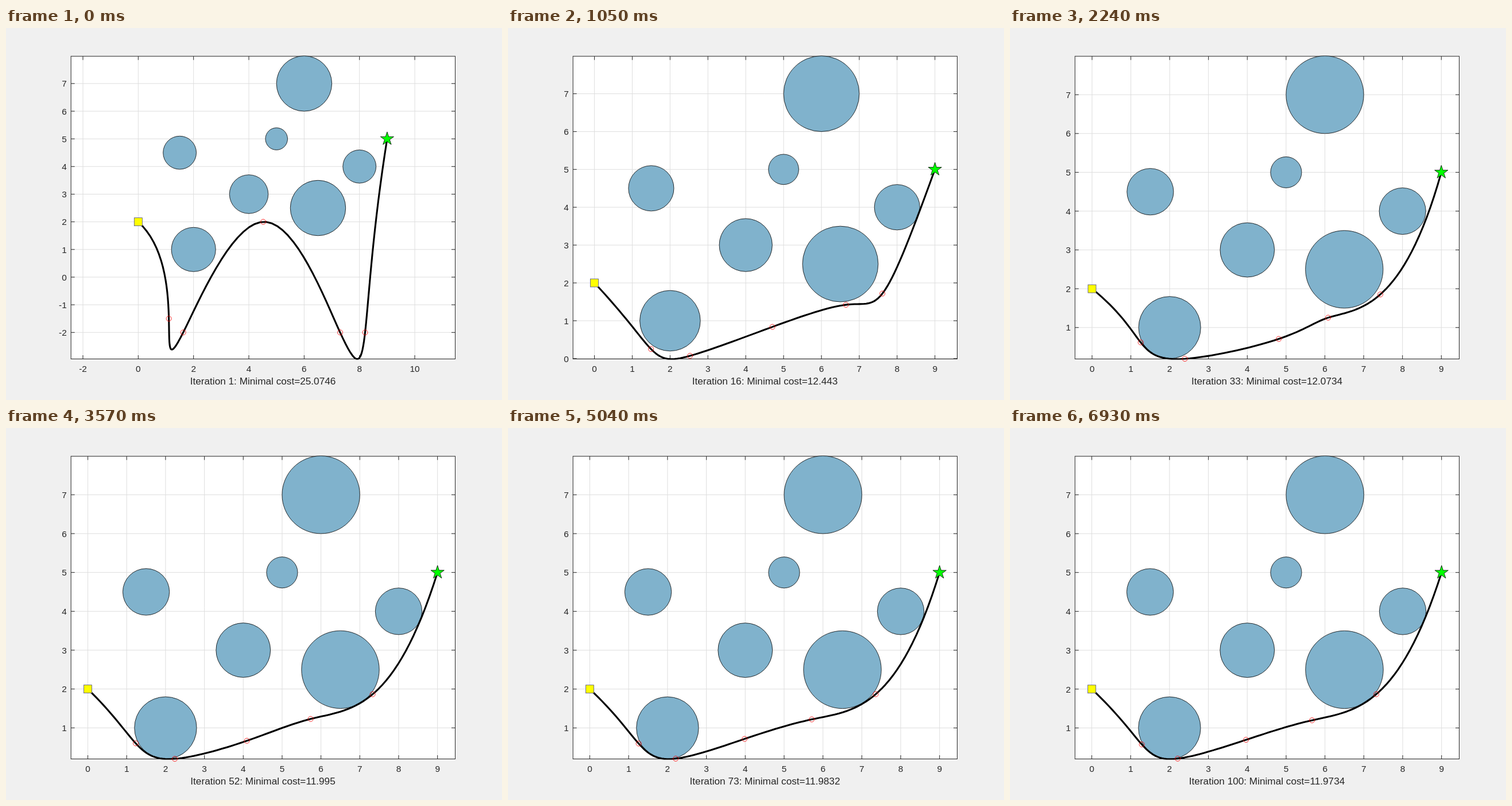
Recreate the animation shown at these times as an HTML page with a canvas. Size 864x648 px, loop 7 s.

```html
<!DOCTYPE html>
<html>
<head>
<meta charset="utf-8">
<style>
html, body { margin: 0; height: 100%; overflow: hidden; background: #f0f0f0; }
canvas { display: block; }
</style>
</head>
<body>
<canvas id="stage" width="864" height="648"></canvas>
<script>
const ctx = document.getElementById('stage').getContext('2d');
// Plot area as fractions of the stage
const LEFT = .13 * 864, RIGHT = .905 * 864, TOP = .075 * 648, BOTTOM = .89 * 648;
// Border lines, on the pixel grid
const BOX = { left: 113.2, right: 782.5, top: 49.2, bottom: 576.5 };
const INK = '#262626', GRID = '#dedede', FONT = '"Liberation Sans", Arial, sans-serif';
const START = [0, 2], GOAL = [9, 5], Y_MAX = 8;
const STEP_MS = 70, STEPS = 100;

// x, y, radius
const obstacles = [
  [1.5, 4.5, .6], [4, 3, .7], [2, 1, .8], [6, 7, 1],
  [5, 5, .4], [8, 4, .6], [6.5, 2.5, 1]
];

// Best solutions: iteration, cost and the five path handles
const solutions = [
  { at: 1, cost: 25.0746, x: [1.107, 1.627, 4.52, 7.3, 8.203], y: [-1.5, -2, 2, -2, -2] },
  { at: 7, cost: 13.4485, x: [1.258, 2.382, 4.815, 6.351, 8.437], y: [.506, -.222, -.495, .571, 1.994] },
  { at: 16, cost: 12.443, x: [1.496, 2.527, 4.705, 6.648, 7.611], y: [.252, .073, .838, 1.422, 1.718] },
  { at: 33, cost: 12.0734, x: [1.253, 2.392, 4.811, 6.083, 7.429], y: [.618, .195, .707, 1.254, 1.854] },
  { at: 52, cost: 11.995, x: [1.233, 2.238, 4.093, 5.734, 7.33], y: [.602, .203, .668, 1.23, 1.866] },
  { at: 73, cost: 11.9832, x: [1.257, 2.21, 3.983, 5.711, 7.358], y: [.599, .21, .718, 1.22, 1.869] },
  { at: 100, cost: 11.9734, x: [1.287, 2.21, 3.968, 5.667, 7.321], y: [.576, .211, .695, 1.197, 1.869] }
];

function solutionAt(iteration) {
  let i = 0;
  while (i < solutions.length - 2 && solutions[i + 1].at <= iteration) i++;
  const a = solutions[i], b = solutions[i + 1];
  const u = 1 - (1 - (iteration - a.at) / (b.at - a.at)) ** 2;
  const mix = (p, q) => p.map((v, k) => v + (q[k] - v) * u);
  return {
    cost: a.cost * (b.cost / a.cost) ** u,
    x: [START[0], ...mix(a.x, b.x), GOAL[0]],
    y: [START[1], ...mix(a.y, b.y), GOAL[1]]
  };
}

// Not-a-knot cubic spline through seven evenly spaced values
function spline(v) {
  const d = v.map((c, i) => v[i - 1] - 2 * c + v[i + 1]);
  const p = 6 * d[2] - d[1], q = 6 * d[4] - d[5];
  const m3 = (6 * d[3] - (p + q) / 4) / 3.5;
  const m2 = (p - m3) / 4, m4 = (q - m3) / 4;
  const m = [2 * d[1] - m2, d[1], m2, m3, m4, d[5], 2 * d[5] - m4];
  return Array.from({ length: 100 }, (_, k) => {
    const s = k / 99 * 6, i = Math.min(5, Math.floor(s)), b = s - i, a = 1 - b;
    return a * v[i] + b * v[i + 1] + (m[i] * (a ** 3 - a) + m[i + 1] * (b ** 3 - b)) / 6;
  });
}

function line(x1, y1, x2, y2, color) {
  ctx.strokeStyle = color;
  ctx.beginPath();
  ctx.moveTo(x1, y1);
  ctx.lineTo(x2, y2);
  ctx.stroke();
}

function circle(x, y, r, stroke, fill) {
  ctx.beginPath();
  ctx.arc(x, y, r, 0, 2 * Math.PI);
  if (fill) { ctx.fillStyle = fill; ctx.fill(); }
  ctx.strokeStyle = stroke;
  ctx.stroke();
}

function text(str, x, y, size, align) {
  ctx.font = `${size}px ${FONT}`;
  ctx.textAlign = align;
  ctx.fillStyle = INK;
  ctx.fillText(str, x, y);
}

function ticks(from, to, step) {
  const out = [];
  for (let v = Math.ceil(from / step) * step; v <= to; v += step) out.push(v);
  return out;
}

function drawAxes(px, py, scale, xMid, yMin) {
  const { left, right, top, bottom } = BOX;
  const half = (RIGHT - LEFT) / 2 / scale;
  const xs = ticks(xMid - half, xMid + half, half > 6 ? 2 : 1);
  const ys = ticks(yMin, Y_MAX - .01, 1);
  ctx.fillStyle = '#fff';
  ctx.fillRect(left, top, right - left, bottom - top);
  ctx.lineWidth = 1;
  for (const v of xs) line(px(v), top, px(v), bottom, GRID);
  for (const v of ys) line(left, py(v), right, py(v), GRID);
  for (const v of xs) {
    const x = px(v);
    line(x, bottom, x, bottom - 6.5, INK);
    line(x, top, x, top + 6.5, INK);
    text(String(v + 0), x, 598.7, 15.4, 'center');
  }
  for (const v of ys) {
    const y = py(v);
    line(left, y, left + 6.5, y, INK);
    line(right, y, right - 6.5, y, INK);
    text(String(v + 0), 105.8, y + 5.7, 15.4, 'right');
  }
  ctx.strokeStyle = INK;
  ctx.strokeRect(left, top, right - left, bottom - top);
}

function drawPath(xs, ys, px, py) {
  ctx.save();
  ctx.beginPath();
  ctx.rect(LEFT - 1, TOP - 1, RIGHT - LEFT + 2, BOTTOM - TOP + 2);
  ctx.clip();
  ctx.beginPath();
  xs.forEach((x, i) => ctx.lineTo(px(x), py(ys[i])));
  ctx.strokeStyle = '#000';
  ctx.lineWidth = 3.1;
  ctx.lineJoin = 'round';
  ctx.stroke();
  ctx.restore();
}

function drawStar(x, y, radius) {
  ctx.beginPath();
  for (let i = 0; i < 10; i++) {
    const r = i % 2 ? radius * .382 : radius, a = i * Math.PI / 5;
    ctx.lineTo(x + r * Math.sin(a), y - r * Math.cos(a));
  }
  ctx.closePath();
  ctx.fillStyle = '#0f0';
  ctx.fill();
  ctx.strokeStyle = '#000';
  ctx.stroke();
}

function draw(iteration) {
  const best = solutionAt(iteration);
  const xs = spline(best.x), ys = spline(best.y);
  // Equal axes fitted to the path and the obstacles
  const yMin = Math.min(.2, ...ys);
  const xMid = (Math.min(0, ...xs) + Math.max(9, ...xs)) / 2;
  const scale = (BOTTOM - TOP) / (Y_MAX - yMin);
  const px = x => (LEFT + RIGHT) / 2 + (x - xMid) * scale;
  const py = y => TOP + (Y_MAX - y) * scale;

  ctx.fillStyle = '#f0f0f0';
  ctx.fillRect(0, 0, 864, 648);
  drawAxes(px, py, scale, xMid, yMin);
  ctx.lineWidth = .8;
  for (const [x, y, r] of obstacles) circle(px(x), py(y), r * scale, '#000', '#80b2cc');
  drawPath(xs, ys, px, py);
  for (let i = 1; i < 6; i++) circle(px(best.x[i]), py(best.y[i]), 4.5, '#f00');

  const [sx, sy] = [px(START[0]), py(START[1])];
  ctx.fillStyle = '#ff0';
  ctx.fillRect(sx - 7, sy - 7, 14, 14);
  ctx.strokeStyle = '#4a4a90';
  ctx.strokeRect(sx - 7, sy - 7, 14, 14);
  drawStar(px(GOAL[0]), py(GOAL[1]), 12.2);

  const cost = Number(best.cost.toFixed(4));
  text(`Iteration ${iteration}: Minimal cost=${cost}`, 447.5, 620.5, 17.2, 'center');
}

function tick() {
  draw(Math.floor(performance.now() / STEP_MS) % STEPS + 1);
  requestAnimationFrame(tick);
}
tick();
</script>
</body>
</html>
```
